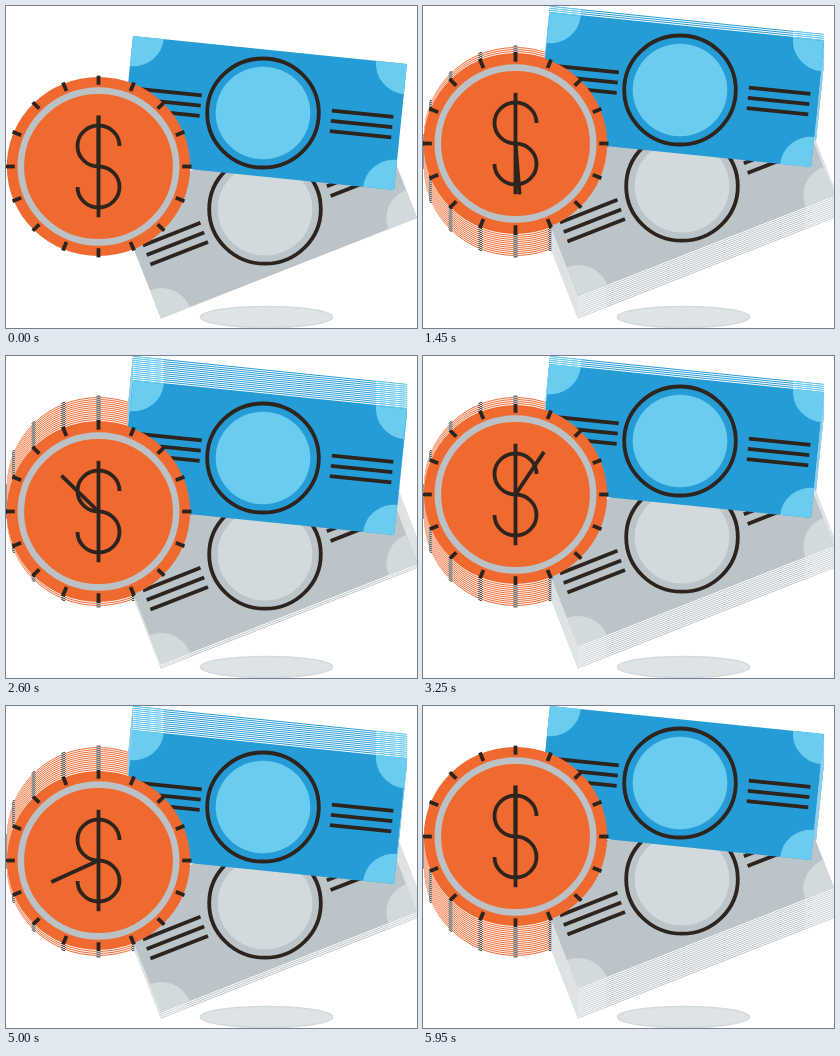
An HTML page with a canvas for the animation above (6000 ms loop, 411 by 322 pixels).

```html
<!DOCTYPE html>
<html lang="en">
<head>
<meta charset="utf-8">
<title>Floating money</title>
<style>
html, body { margin: 0; width: 100%; height: 100%; overflow: hidden; background: #fff; }
canvas { display: block; }
</style>
</head>
<body>
<canvas id="stage" width="411" height="322"></canvas>
<script>
const ctx = document.getElementById('stage').getContext('2d');
const TAU = Math.PI * 2;
const INK = '#2d241e', ORANGE = '#f0692f', RING = '#bcc1c5';
const STEP = 50, FRAMES = 120, LAST = FRAMES - 1, RISE = 30, SWEEPS = 5;
const SQUASH = 0.977;
const COIN = { x: 92.5, y: 160.5 };

const BLUE = { x: 257.5, y: 107, w: 275.4, h: 126.7, angle: 5.85, cx: 257, shift: 2.3,
  base: '#269cd6', light: '#6accef' };
const GREY = { x: 260, y: 203.2, w: 275.2, h: 126.7, angle: -21.4, cx: 259, shift: -0.5,
  base: '#bbc4c8', light: '#d3dadd' };

function disc(x, y, r, color) {
  ctx.beginPath();
  ctx.ellipse(x, y, r, r * SQUASH, 0, 0, TAU);
  ctx.fillStyle = color;
  ctx.fill();
}

function ring(x, y, r, width, color) {
  ctx.beginPath();
  ctx.ellipse(x, y, r, r * SQUASH, 0, 0, TAU);
  ctx.lineWidth = width;
  ctx.strokeStyle = color;
  ctx.stroke();
}

function line(x1, y1, x2, y2) {
  ctx.beginPath();
  ctx.moveTo(x1, y1);
  ctx.lineTo(x2, y2);
  ctx.stroke();
}

function bill(b, blank) {
  const w = b.w / 2, h = b.h / 2;
  ctx.save();
  ctx.translate(b.x, b.y);
  ctx.rotate(b.angle * Math.PI / 180);
  ctx.beginPath();
  ctx.rect(-w, -h, b.w, b.h);
  ctx.fillStyle = blank || b.base;
  ctx.fill();
  if (!blank) {
    ctx.clip();
    for (const sx of [-1, 1])
      for (const sy of [-1, 1]) disc(sx * w, sy * h, 31, b.light);
    ctx.strokeStyle = INK;
    ctx.lineWidth = 3.8;
    for (const side of [-1, 1])
      for (const row of [-1, 0, 1]) {
        const v = row * 10.3 + side * 0.9;
        line(b.shift + side * 65.5, v, b.shift + side * 127.3, v);
      }
  }
  ctx.restore();
  if (!blank) {
    disc(b.cx, b.y, 47.3, b.light);
    ring(b.cx, b.y, 55.8, 3.8, INK);
  }
}

function coin(blank) {
  ctx.save();
  ctx.translate(COIN.x, COIN.y);
  disc(0, 0, 91.7, blank || ORANGE);
  ctx.strokeStyle = blank || INK;
  ctx.lineWidth = 3.8;
  for (let i = 0; i < 16; i++) {
    const a = i * TAU / 16, c = Math.cos(a), s = Math.sin(a) * SQUASH;
    line(c * 83.7, s * 83.7, c * 93, s * 93);
  }
  if (!blank) {
    ring(0, 0, 77.7, 6.6, RING);
    ctx.strokeStyle = INK;
    ctx.lineWidth = 3.8;
    line(0, -50.7, 0, 50.7);
    ctx.beginPath();
    ctx.ellipse(0, -20.5, 21, 20.5, 0, 0, Math.PI / 2, true);
    ctx.ellipse(0, 20.5, 21, 20.5, 0, -Math.PI / 2, Math.PI);
    ctx.stroke();
  }
  ctx.restore();
}

function money(lift, blank) {
  ctx.save();
  ctx.translate(0, -lift);
  bill(GREY, blank);
  bill(BLUE, blank);
  coin(blank);
  ctx.restore();
}

function hand(lift, turn) {
  ctx.strokeStyle = INK;
  ctx.lineWidth = 3.8;
  const y = COIN.y - lift;
  line(COIN.x, y, COIN.x + Math.sin(turn) * 52, y - Math.cos(turn) * 51);
}

function liftAt(frame) {
  const p = frame / LAST * SWEEPS % 2;
  return Math.floor(RISE * (p <= 1 ? p : 2 - p) + 0.08);
}

function draw(frame) {
  const lift = liftAt(frame);
  const top = frame < 24 ? lift : RISE;
  ctx.fillStyle = '#fff';
  ctx.fillRect(0, 0, 411, 322);

  ctx.beginPath();
  ctx.ellipse(260.5, 311, 66, 10.5, 0, 0, TAU);
  ctx.fillStyle = '#dee3e6';
  ctx.fill();
  ctx.strokeStyle = '#d3dade';
  ctx.lineWidth = 1.5;
  ctx.stroke();

  // Thin striped trails over every height passed, outermost first
  for (let d = RISE; d > 0; d--)
    for (const k of [lift - d, lift + d])
      if (k >= 0 && k <= top) money(k, k % 2 ? '#fff' : null);

  money(lift);
  hand(lift, frame / LAST * 2 * TAU);
}

let shown = -1;
function tick() {
  const frame = Math.floor(performance.now() / STEP) % FRAMES;
  if (frame !== shown) draw(shown = frame);
  requestAnimationFrame(tick);
}
tick();
</script>
</body>
</html>
```
